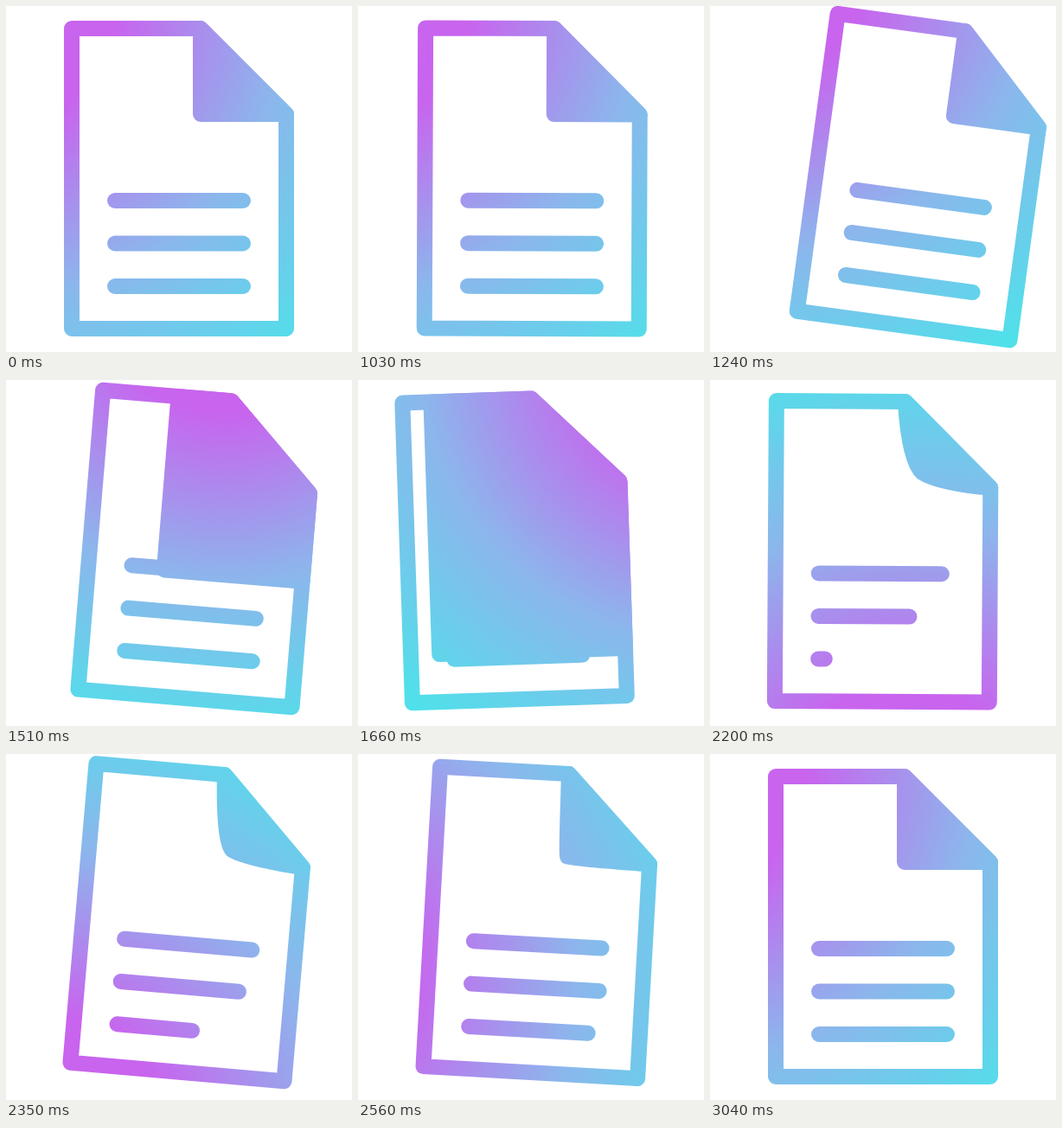
These frames come from a looping animation (400x400 px, 3.43 s). An HTML page with a canvas:

```html
<!DOCTYPE html>
<html lang="en">
<head>
<meta charset="utf-8">
<title>Document icon</title>
<style>
html, body { margin: 0; width: 100%; height: 100%; overflow: hidden; background: #fff; }
canvas { display: block; width: 100vmin; height: 100vmin; }
</style>
</head>
<body>
<canvas id="stage" width="400" height="400"></canvas>
<script>
const ctx = document.getElementById('stage').getContext('2d');
const LOOP = 3430, START = 1030, STEP = 30, RAD = Math.PI / 180;

const clamp = u => Math.min(1, Math.max(0, u));

// Rises smoothly from 0 to 1 between two times.
function ease(t, from, to) {
  const u = clamp((t - from) / (to - from));
  return u * u * (3 - 2 * u);
}

// Leaves 0 at the first time, then eases through each [time, value] turning point.
function swing(t, from, ...turns) {
  let value = 0, last = 0;
  for (const [to, next] of turns) {
    value += (next - last) * ease(t, from, to);
    from = to;
    last = next;
  }
  return value;
}

function trace(...points) {
  ctx.beginPath();
  points.forEach(p => ctx.lineTo(...p));
}

function drawSheet() {
  trace([76, 26], [225, 26], [324, 125], [324, 373], [76, 373]);
  ctx.closePath();
  ctx.stroke();
}

// The flap grows over the whole sheet, then flips back with a soft, bent tip.
function drawFold(t) {
  const cover = swing(t, 1250, [1840, 1], [2130, 0]);
  const bend = swing(t, 2000, [2200, 1], [2700, 0]);
  const left = 225 - 149 * cover, low = 125 + 248 * cover;
  const x = left + 20 * bend, y = low - 17 * bend;
  trace([324, 125], [225, 26], [left, 26]);
  ctx.bezierCurveTo(left + 3 * bend, 26 + 45 * bend, x - 10 * bend, y - 9 * bend, x, y);
  ctx.bezierCurveTo(x + 12 * bend, y + 8 * bend, 324 - 34 * bend, low - 2 * bend, 324, low);
  ctx.closePath();
  ctx.fill();
  ctx.stroke();
}

// The lines vanish under the flap and are written again one after another.
function drawLines(t) {
  for (let i = 0; i < 3; i++) {
    const u = t < 1700 ? 1 : clamp((t - 1785 - 202 * i) / 630);
    if (u === 0) continue;
    const y = 225 + 49.5 * i;
    trace([126, y], [274 - 148 * (1 - u) ** 3, y]);
    ctx.stroke();
  }
}

// A radial gradient whose centre circles the stage once.
function paint(t) {
  const a = (221 + 355 * ease(t, 1000, 3020)) * RAD;
  const x = 215 + 300 * Math.cos(a), y = 195 + 300 * Math.sin(a);
  const g = ctx.createRadialGradient(x, y, 140, x, y, 530);
  ['#c864ee', '#8cb6ec', '#50e0ea'].forEach((c, i) => g.addColorStop(i / 2, c));
  ctx.globalCompositeOperation = 'source-in';
  ctx.fillStyle = g;
  ctx.fillRect(0, 0, 400, 400);
}

function draw(t) {
  const shift = swing(t, 1000, [1310, 54], [1810, -39], [2400, 14], [2800, 0]);
  const lift = swing(t, 1030, [1500, -4.5], [2100, 0], [2450, -6], [2800, 0]);
  const tilt = swing(t, 1000, [1320, 9.2], [1900, -8.5], [2410, 5.5], [2750, 0]);
  ctx.reset();
  ctx.lineWidth = 18;
  ctx.lineCap = ctx.lineJoin = 'round';
  ctx.save();
  ctx.translate(200 + shift, 200 + lift);
  ctx.rotate(tilt * RAD);
  ctx.translate(-200, -200);
  drawSheet();
  drawFold(t);
  drawLines(t);
  ctx.restore();
  paint(t);
}

function tick() {
  const t = performance.now() % LOOP;
  draw(t < START ? 0 : t - (t - START) % STEP);
  requestAnimationFrame(tick);
}
tick();
</script>
</body>
</html>
```
